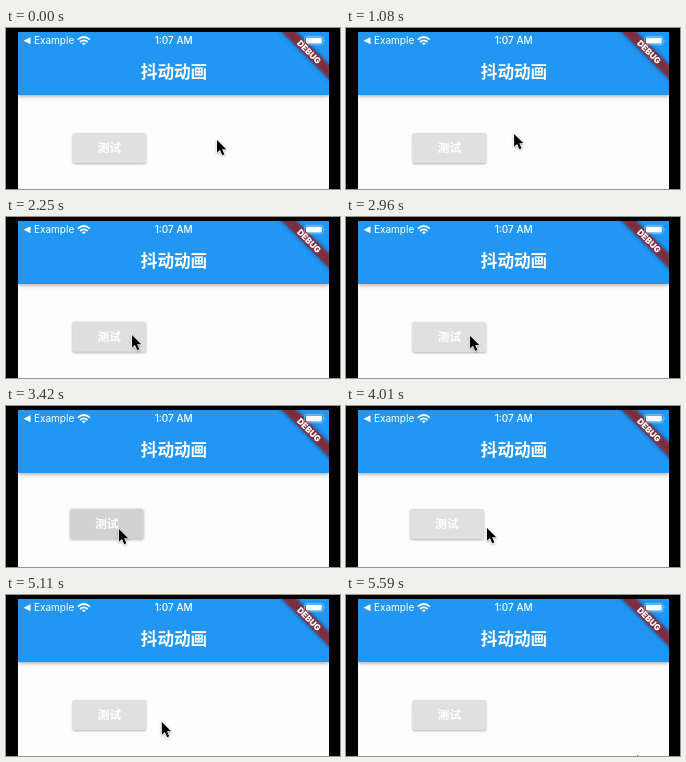
An HTML page for the animation above (6040 ms loop, 334 px wide and 161 px high).

```html
<!DOCTYPE html>
<html lang="zh">
<head>
<meta charset="utf-8">
<title>抖动动画</title>
<style>
  html, body { margin: 0; width: 100%; height: 100%; overflow: hidden; background: #000; }
  svg { display: block; width: 334px; height: 161px; }
  text { fill: #fff; font-family: Inter, Roboto, "Noto Sans CJK SC", "Noto Sans CJK", sans-serif; }
  .cjk { font-family: "Noto Sans CJK SC", "Noto Sans CJK", sans-serif; font-weight: 700; text-anchor: middle; }
  .bar { filter: drop-shadow(0 1.5px 2px rgba(0, 0, 0, .38)); }
  .shade { filter: blur(2.2px); }
  #cursor { filter: drop-shadow(0 1px 1px rgba(0, 0, 0, .3)); }
</style>
</head>
<body>
<svg viewBox="0 0 334 161">
  <defs>
    <clipPath id="screen"><rect x="12" y="4" width="311" height="157"/></clipPath>
  </defs>
  <rect width="334" height="161"/>
  <g clip-path="url(#screen)">
    <rect x="12" y="4" width="311" height="157" fill="#fdfdfd"/>
    <rect class="bar" x="12" y="0" width="311" height="67" fill="#2196f3"/>
    <text class="cjk" x="168" y="50" font-size="16.6">抖动动画</text>

    <g id="button">
      <rect id="face" x="66.8" y="105" width="73.2" height="30" rx="1.7"/>
      <text class="cjk" x="103.4" y="124.3" font-size="11.6">测试</text>
    </g>

    <g transform="translate(323 4) rotate(45)">
      <rect class="shade" x="-40" y="23.2" width="80" height="10" fill-opacity=".5"/>
      <rect x="-40" y="23.2" width="80" height="10" fill="#b71c1c" fill-opacity=".63"/>
      <text x="0" y="31.3" font-size="8.5" font-weight="900" text-anchor="middle">DEBUG</text>
    </g>

    <!-- status bar -->
    <path d="M17.5 12.8L24.5 9.3V16.3Z" fill="#fff"/>
    <text x="28" y="16.4" font-size="10">Example</text>
    <g fill="none" stroke="#fff" stroke-width="1.7">
      <path d="M71.8 11.6Q77.8 6.4 83.8 11.6"/>
      <path d="M74 14Q77.8 10.7 81.6 14"/>
    </g>
    <path d="M75.8 15.2Q77.8 13.6 79.8 15.2L77.8 17.3Z" fill="#fff"/>
    <text x="167.7" y="16.4" font-size="10" font-weight="500" text-anchor="middle">1:07 AM</text>
    <rect x="298.6" y="8.4" width="18.6" height="8.4" rx="2.2" fill="none" stroke="#fff" stroke-opacity=".45" stroke-width=".8"/>
    <rect x="300" y="9.8" width="15.8" height="5.6" rx="1.1" fill="#fff"/>
    <path d="M318.2 11.2Q319.6 12.6 318.2 14Z" fill="#fff" fill-opacity=".5"/>
  </g>
  <path id="cursor" d="M0 0V14.5L3.4 11.3L6 17.2L8.4 16.2L5.8 10.5H10.5Z"
        stroke="#fff" stroke-width="1.4" stroke-linejoin="round" paint-order="stroke"/>
</svg>
<script>
  const LOOP = 6040;
  const TAPS = [1504, 3187];
  const SHAKE = 152, SHAKES = 6, REACH = 2.6;

  const byId = id => document.getElementById(id);
  const button = byId('button'), face = byId('face'), cursor = byId('cursor');

  const clamp = v => Math.max(0, Math.min(1, v));
  const arc = k => Math.sin(Math.PI * k);
  function ease(t, start, end) {
    const k = clamp((t - start) / (end - start));
    return k * k * (3 - 2 * k);
  }

  function pointer(t) {
    const arrive = ease(t, 900, 1260);
    const nudge = ease(t, 2900, 3150);
    const back = ease(t, 3580, 3990);
    const swing = ease(t, 4180, 4470);
    const leave = ease(t, 5000, 5590);
    return [
      211 - 85 * arrive - 13 * nudge + 28 * back + swing + 9 * arc(swing) + 149 * leave,
      112 + 6 * arrive - 9 * arc(arrive) + 5 * nudge - back + 5 * swing + 33 * leave ** 4
    ];
  }

  function draw(t) {
    const age = t - (t < TAPS[1] ? TAPS[0] : TAPS[1]);
    const shaking = age > 0 && age < SHAKE * SHAKES;
    const shift = shaking ? -REACH / 2 * (1 - Math.cos(2 * Math.PI * age / SHAKE)) : 0;
    const press = Math.min(clamp(age / 200), clamp((780 - age) / 430));
    const grey = Math.round(224 - 14 * press);

    face.setAttribute('fill', `rgb(${grey},${grey},${grey})`);
    face.style.filter = `drop-shadow(0 ${1 + 0.5 * press}px ${0.8 + 0.8 * press}px rgba(0,0,0,.3))`;
    button.setAttribute('transform', `translate(${shift} ${shift * 0.85})`);
    cursor.setAttribute('transform', `translate(${pointer(t)}) scale(.88)`);
  }

  const origin = performance.now();
  function tick() {
    draw((performance.now() - origin) % LOOP);
    requestAnimationFrame(tick);
  }
  tick();
</script>
</body>
</html>
```
